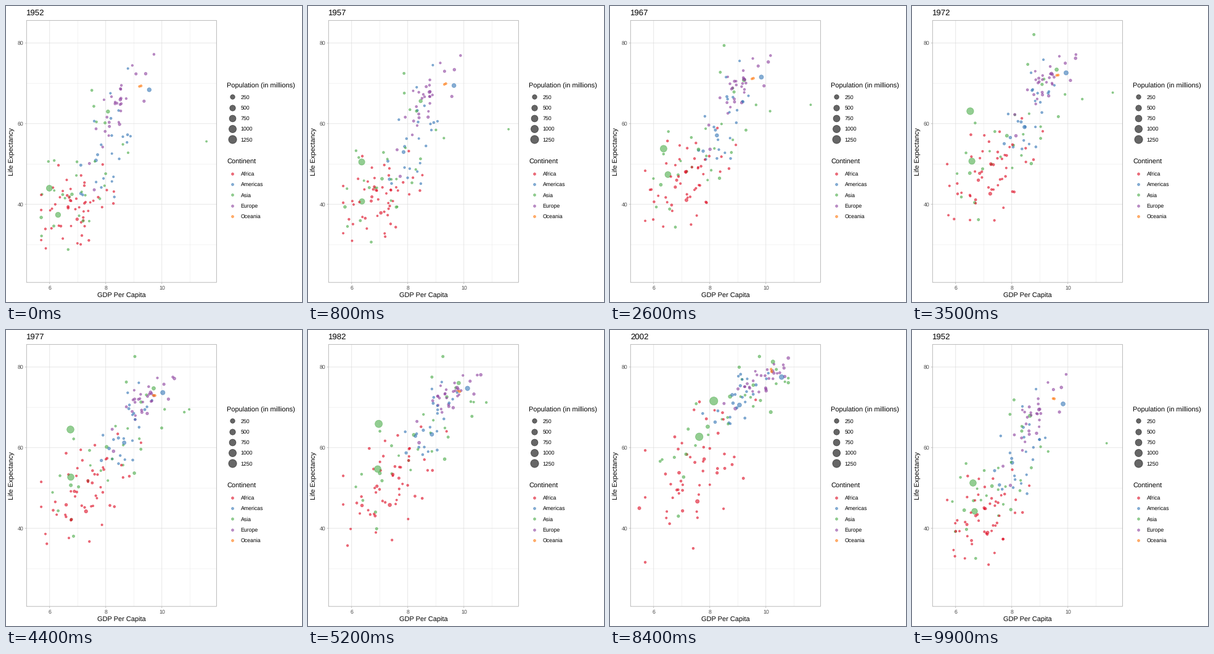
Write a matplotlib script that moves like this. It is 480 px wide and 480 px high and loops after 10000 ms.

```python
import matplotlib.pyplot as plt
import numpy as np
from matplotlib.animation import FuncAnimation
from matplotlib.patches import Rectangle

plt.rcParams.update({"font.family": "Liberation Sans", "text.hinting": "none",
                     "path.snap": False})
SIZE, DPI, ALPHA, STROKE = 480, 72, 0.6, 0.71
LEFT, TOP, RIGHT, BOTTOM = 33.3, 23.4, 341.4, 448.2
STARTS = [5, 14, 23, 32, 41, 49, 57, 65, 73, 81, 89, 97]  # first step of each move
STEPS, YEARS = 4, 12
T = np.linspace(0, 1, YEARS)[:, None]
COLORS = dict(Africa="#DF0F26", Americas="#3677B7", Asia="#4BAC49",
              Europe="#8F44A0", Oceania="#FF780C")

# Per continent: count, population start and end, then start/middle/end of
# the mean and spread of log GDP, of life expectancy, and their correlation.
TRENDS = dict(
    Africa=(52, 2.5, 8.5, (6.87, 7.30, 7.50), (.68, .82, .92),
            (39.1, 49.6, 54.8), (5.1, 6.6, 9.4), (.3, .5, .4)),
    Americas=(25, 4.5, 11, (8.10, 8.75, 9.05), (.52, .52, .65),
              (53.3, 64.4, 73.6), (9.0, 6.8, 4.2), (.6, .75, .75)),
    Asia=(33, 7, 22, (7.05, 8.20, 8.75), (.85, 1.1, 1.2),
          (46.3, 59.6, 70.7), (9.0, 9.0, 7.0), (.5, .7, .8)),
    Europe=(30, 8, 10, (8.45, 9.40, 9.95), (.50, .48, .58),
            (64.4, 71.9, 77.6), (5.6, 2.9, 2.7), (.8, .75, .85)),
    Oceania=(2, 6, 12, (9.23, 9.72, 10.29), (.03, .05, .16),
             (69.3, 72.9, 80.7), (.15, .6, .5), (.9, .9, .9)))

# Dots that stand out: population range and (state, log GDP, life) key points.
LEADERS = dict(
    Africa=[((2.5, 9), [(0, 6.20, 40.0), (7, 6.74, 44.0), (8, 6.60, 23.6),
                        (9, 6.38, 36.1), (11, 6.76, 46.2)]),
            ((14, 65), [(0, 6.66, 39.1), (4, 6.81, 46.0), (10, 5.49, 45.0),
                        (11, 5.63, 46.5)]),
            ((33, 135), [(0, 6.98, 36.3), (6, 7.36, 45.8), (11, 7.61, 46.9)])],
    Americas=[((158, 301), [(0, 9.55, 68.4), (6, 10.13, 74.7), (11, 10.67, 78.2)]),
              ((57, 190), [(0, 7.65, 50.9), (6, 8.86, 63.3), (11, 9.11, 72.4)])],
    Asia=[((556, 1319), [(0, 5.99, 44.0), (1, 6.36, 50.5), (2, 6.19, 44.5),
                         (4, 6.52, 63.1), (8, 7.41, 68.7), (11, 8.51, 73.0)]),
          ((372, 1110), [(0, 6.30, 37.4), (4, 6.58, 50.7), (11, 7.80, 64.7)]),
          ((86, 127), [(0, 8.08, 63.0), (4, 9.60, 73.4), (11, 10.36, 82.6)]),
          ((.2, 2.5), [(0, 11.59, 55.6), (4, 11.60, 67.7), (6, 10.35, 71.3),
                       (11, 10.76, 77.6)]),
          ((8, 32), [(0, 6.66, 28.8), (6, 6.89, 39.9), (11, 6.88, 43.8)])],
    Europe=[((22, 71), [(0, 7.59, 43.6), (4, 8.15, 57.0), (11, 9.04, 71.8)])])


def px(gdp):
    return LEFT + (gdp - 5.177) * 45.5


def py(life):
    return BOTTOM - (life - 20.65) * 6.541


def point_size(millions):
    return 1 + 5 * np.sqrt(np.asarray(millions) / 1319)


def area(size):
    return (0.75 * (2.845 * size + 0.945)) ** 2


def bend(values):
    """Smooth curve through a start, middle and end value."""
    return np.polyval(np.polyfit([0, 0.45, 1], values, 2), T)


def crowd(rng, n, pop0, pop1, gdp, gdp_sd, life, life_sd, corr):
    """Seeded cloud that follows its trend while each dot drifts slowly."""
    z = np.clip(rng.normal(size=(4, n)), -2.1, 2.1)
    z = (z - z.mean(1, keepdims=True)) / z.std(1, keepdims=True)
    turn = 0.8 * T
    u = z[0] * np.cos(turn) + z[1] * np.sin(turn)
    v = z[2] * np.cos(turn) + z[3] * np.sin(turn)
    r = bend(corr)
    x = bend(gdp) + bend(gdp_sd) * u
    y = bend(life) + bend(life_sd) * (r * u + np.sqrt(1 - r * r) * v)
    people = np.exp(rng.normal(0, 0.9, n)) * pop0 * (pop1 / pop0) ** T
    return np.stack([np.clip(x, 5.7, 10.8), np.clip(y, 28, 82.6), people], axis=1)


def track(pops, keys):
    """One dot moving through its key points."""
    when, gdp, life = zip(*keys)
    k = np.arange(YEARS)
    return np.stack([np.interp(k, when, gdp), np.interp(k, when, life),
                     np.interp(k, (0, YEARS - 1), pops)], axis=1)


rng = np.random.default_rng(7)
clouds, colors = [], []
for name, (n, *trend) in TRENDS.items():
    leaders = [track(*leader) for leader in LEADERS.get(name, [])]
    clouds.append(crowd(rng, n - len(leaders), *trend))
    clouds += [dot[:, :, None] for dot in leaders]
    colors += [COLORS[name]] * n
order = rng.permutation(len(colors))
gdp, life, people = np.concatenate(clouds, axis=2)[:, :, order].swapaxes(0, 1)
states = np.stack([px(gdp), py(life), point_size(people)], axis=1)
colors = np.array(colors)[order]

fig = plt.figure(figsize=(SIZE / DPI, SIZE / DPI), dpi=DPI, facecolor="white")
ax = fig.add_axes([0, 0, 1, 1])
ax.set(xlim=(0, SIZE), ylim=(SIZE, 0))
ax.axis("off")


def text(x, y, label, size, color="black", **kw):
    return ax.text(x, y, label, fontsize=size, color=color, **kw)


def line(xs, ys, color, width):
    ax.plot(xs, ys, color=color, lw=width, solid_capstyle="butt", zorder=1)


def dots(x, y, size, color):
    return ax.scatter(x, y, s=area(size), c=color, edgecolors=color,
                      alpha=ALPHA, linewidths=STROKE, zorder=3)


GRID, EDGE, TICK_TEXT = "#DEDEDE", "#B3B3B3", "#4D4D4D"
for v in (7, 9, 11):
    line([px(v)] * 2, [TOP, BOTTOM], GRID, STROKE / 2)
for v in (30, 50, 70):
    line([LEFT, RIGHT], [py(v)] * 2, GRID, STROKE / 2)
for v in (6, 8, 10):
    line([px(v)] * 2, [TOP, BOTTOM], GRID, STROKE)
    line([px(v)] * 2, [BOTTOM, BOTTOM + 2.75], EDGE, STROKE)
    text(px(v), 460, str(v), 8.8, TICK_TEXT, ha="center")
for v in (40, 60, 80):
    line([LEFT, RIGHT], [py(v)] * 2, GRID, STROKE)
    line([LEFT - 2.75, LEFT], [py(v)] * 2, EDGE, STROKE)
    text(28.4, py(v) + 3.2, str(v), 8.8, TICK_TEXT, ha="right")
ax.add_patch(Rectangle((LEFT, TOP), RIGHT - LEFT, BOTTOM - TOP, fill=False,
                       ec=EDGE, lw=0.9, zorder=4))

text(187.5, 473, "GDP Per Capita", 11, ha="center")
text(10.3, 236, "Life Expectancy", 11, rotation=90, ha="center", va="center")
text(358.3, 132.3, "Population (in millions)", 11)
for i, millions in enumerate((250, 500, 750, 1000, 1250)):
    y = 147.3 + 17.28 * i
    dots([367], [y], point_size(millions), "black")
    text(380.7, y + 3.2, str(millions), 8.8)
text(358.3, 256.2, "Continent", 11)
for i, (name, color) in enumerate(COLORS.items()):
    y = 271.7 + 17.28 * i
    dots([367], [y], 1.5, color)
    text(380.7, y + 3.2, name, 8.8)

title = text(33.2, 15, "1952", 13.2)
cloud = dots(*states[0], colors)


def draw(frame):
    move = sum(frame >= s for s in STARTS) - 1
    k = max(move, 0)
    p = min(1, (frame - STARTS[k] + 1) / STEPS) if move >= 0 else 0
    after = (k + 1) % YEARS
    x, y, size = (1 - p) * states[k] + p * states[after]
    cloud.set_offsets(np.column_stack([x, y]))
    cloud.set_sizes(area(size))
    title.set_text(str(1952 + 5 * (after if p >= 0.5 else k)))
    return cloud, title


anim = FuncAnimation(fig, draw, frames=100, interval=100, repeat=True, blit=False)
plt.show()
```
